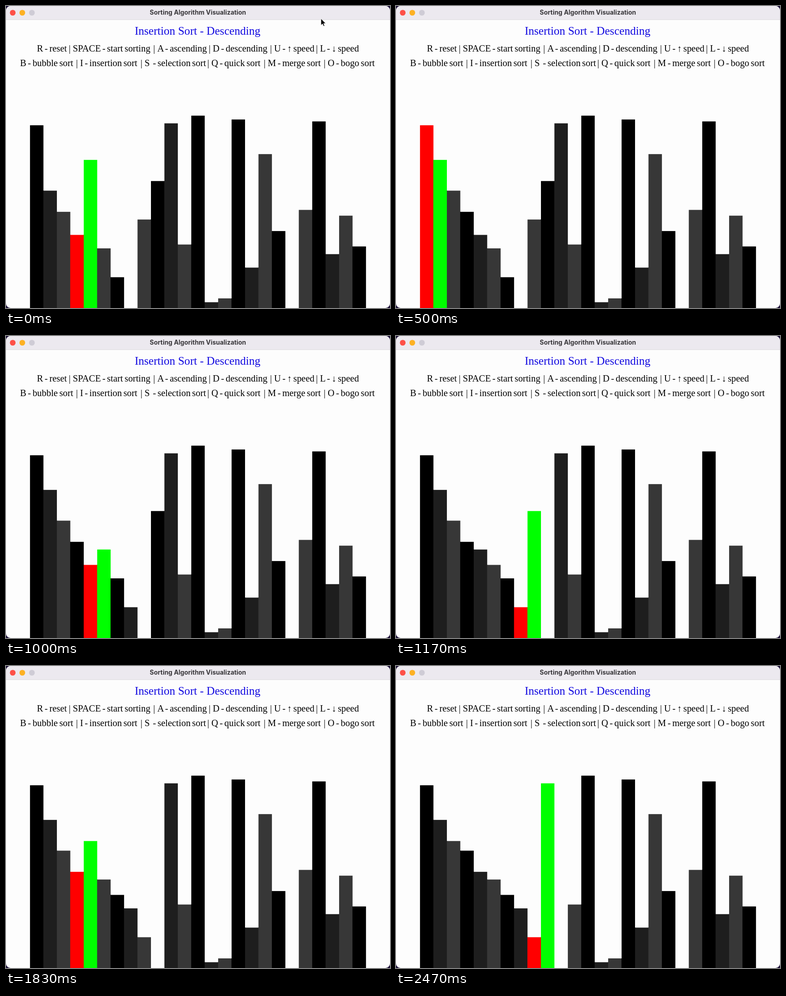
These frames come from a looping animation (845 by 663 pixels, 2.51 s). An HTML page:

```html
<!DOCTYPE html>
<html lang="en">
<head>
<meta charset="utf-8">
<title>Sorting Algorithm Visualization</title>
<style>
  html, body { margin: 0; width: 100%; height: 100%; overflow: hidden; background: #1d1238; }
  svg { display: block; }
  text { font-family: "Liberation Serif", "Times New Roman", serif; white-space: pre; }
  .window-title { font: 700 13.9px Inter, sans-serif; fill: #39373b; }
  .heading { font-size: 25.1px; fill: #1108e0; }
  #help { font-size: 20.4px; word-spacing: -1.6px; }
</style>
</head>
<body>
<svg width="845" height="663" viewBox="0 0 845 663">
  <clipPath id="frame"><rect width="845" height="663" rx="10"/></clipPath>
  <g clip-path="url(#frame)">
    <rect width="845" height="663" fill="#fdfdfd"/>
    <rect width="845" height="30" fill="#ece9ef"/>
    <rect y="29.5" width="845" height="1" fill="#dad7dc"/>
    <circle cx="14.8" cy="14.8" r="6.3" fill="#fe5048"/>
    <circle cx="35.9" cy="14.8" r="6.3" fill="#fdb124"/>
    <circle cx="57" cy="14.8" r="6.3" fill="#cfccd6"/>
    <text class="window-title" x="422.3" y="19" text-anchor="middle">Sorting Algorithm Visualization</text>
    <text class="heading" x="421.5" y="62.5" text-anchor="middle">Insertion Sort - Descending</text>
    <g id="help"></g>
    <!-- The chart lives in an 800 x 628 window, scaled to the stage -->
    <g id="chart" transform="scale(1.05625 1.05573)"></g>
    <path id="pointer" d="M693 27.5v15l3.5-3.2 2.4 5.2 2.4-1-2.3-5.1h4.7z" stroke="#fff"/>
  </g>
</svg>
<script>
const LOOP = 2510, FRAME = 100 / 3;
const LEFT = 50, FLOOR = 628, BAR = 28, UNIT = 4;
const SHADES = ['#000', '#1e1e1e', '#373737'];
const values = [95, 61, 50, 38, 77, 31, 16, 0, 46, 66, 96, 33, 100,
  3, 5, 98, 21, 80, 40, 0, 51, 97, 28, 48, 32];
// Video tick at which each swap becomes visible
const ticks = [0, 1, 6, 11, 16, 21, 26, 31, 35, 41, 46, 51, 55, 61, 66, 71];

const el = id => document.getElementById(id);

function add(parent, tag, attrs) {
  const node = document.createElementNS('http://www.w3.org/2000/svg', tag);
  for (const key in attrs) node.setAttribute(key, attrs[key]);
  return parent.appendChild(node);
}

function helpLine(y, items) {
  items.forEach(([x, label], i) => {
    add(el('help'), 'text', { x, y }).textContent = label;
    if (i) add(el('help'), 'text', { x: x - 7, y, 'text-anchor': 'middle' }).textContent = '|';
  });
}

helpLine(100, [[68, 'R - reset'], [147, 'SPACE - start sorting'], [333, 'A - ascending'],
  [455, 'D - descending'], [590, 'U - ↑ speed'], [691, 'L - ↓ speed']]);
helpLine(132, [[31, 'B - bubble sort'], [163, 'I - insertion sort'], [305, 'S  - selection sort'],
  [452, 'Q - quick sort'], [576, 'M - merge sort'], [708, 'O - bogo sort']]);

// Descending insertion sort, resumed at index 4, one state per swap
function sortStates(list) {
  const states = [{ list: [...list], active: 4 }];
  for (let i = 4; i < list.length; i++) {
    for (let j = i; j > 0 && list[j - 1] < list[j]; j--) {
      [list[j - 1], list[j]] = [list[j], list[j - 1]];
      states.push({ list: [...list], active: j - 1 });
    }
  }
  return states;
}

const states = sortStates([...values]);
const column = (x, width) => add(el('chart'), 'rect', { x, width });
// Seams sit behind touching bars so no background shows between them
const seams = values.map((_, i) => column(LEFT + BAR * i - 0.8, 1.6));
const bars = values.map((_, i) => column(LEFT + BAR * i, BAR));

function paint(rect, value, fill) {
  rect.setAttribute('y', FLOOR - value * UNIT);
  rect.setAttribute('height', value * UNIT);
  rect.setAttribute('fill', fill);
}

function draw(now) {
  const tick = Math.floor((now % LOOP) / FRAME + 0.2);
  const { list, active } = states[ticks.filter(t => t <= tick).length - 1];
  const shade = i => i === active ? '#0f0' : i === active - 1 ? '#f00' : SHADES[i % 3];
  list.forEach((value, i) => {
    paint(seams[i], Math.min(value, list[i - 1] ?? 0), shade(i));
    paint(bars[i], value, shade(i));
  });
  el('pointer').style.display = tick < 3 ? '' : 'none';
  requestAnimationFrame(draw);
}
draw(0);
</script>
</body>
</html>
```
